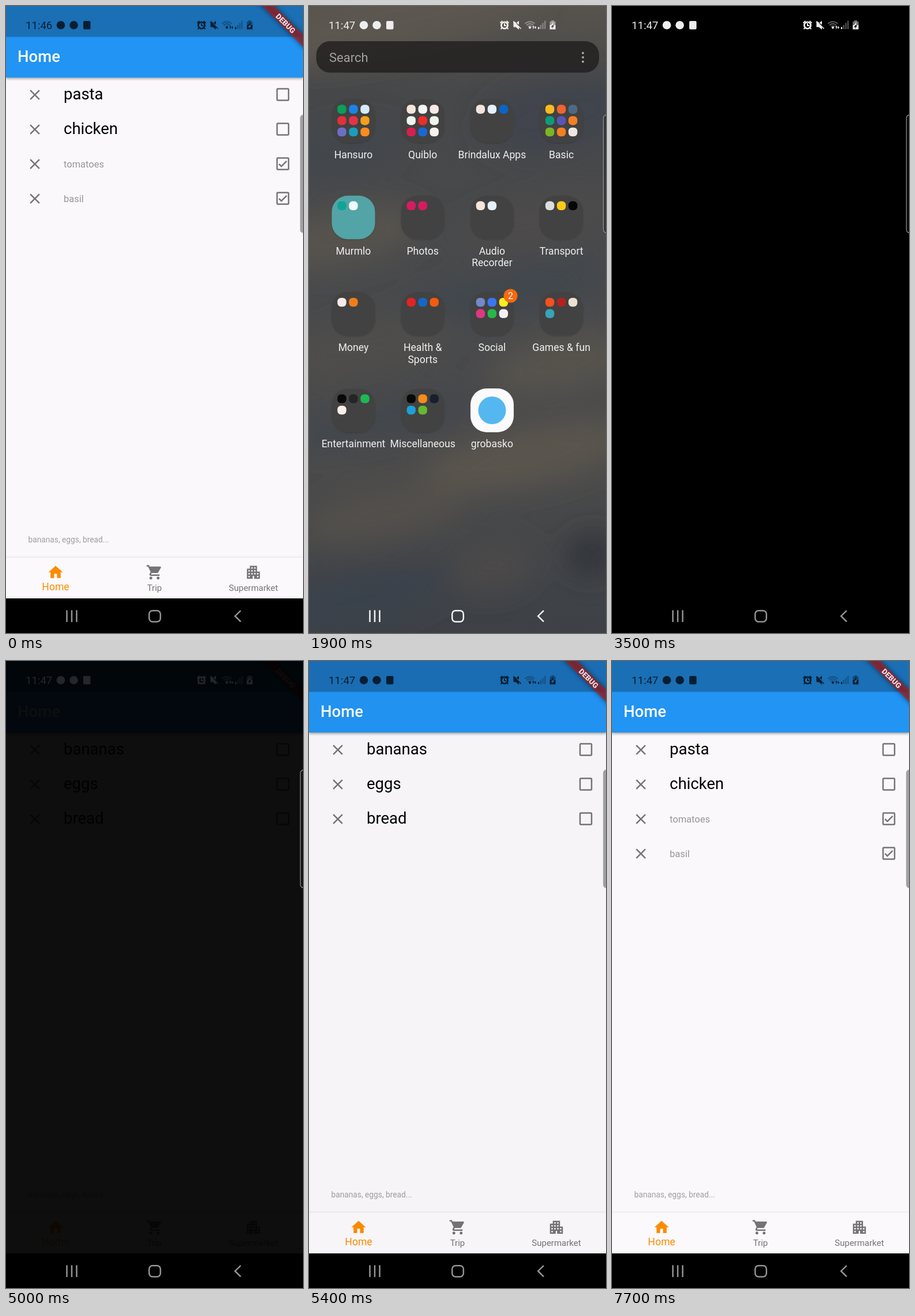
These frames come from a looping animation (515 px wide and 1087 px high, 7.8 s). An HTML page:

```html
<!DOCTYPE html>
<html lang="en">
<head>
<meta charset="utf-8">
<title>Shopping list</title>
<style>
  html, body { margin: 0; width: 100%; height: 100%; overflow: hidden; background: #000; }
  svg { display: block; width: 100vw; height: 100vh; }
  text { font-family: Roboto, sans-serif; white-space: pre; }
  .mid { text-anchor: middle; }
</style>
</head>
<body>
<svg id="stage" viewBox="0 0 515 1087" preserveAspectRatio="none"></svg>
<script>
const LOOP = 7800, STEP = 100, W = 515, H = 1087;
const ICON = { x: 280, y: 663, w: 75, h: 76, r: 28 };
const GREY = '#747376';

const PATHS = {
  clear: 'M19 6.41 17.59 5 12 10.59 6.41 5 5 6.41 10.59 12 5 17.59 6.41 19 12 13.41 17.59 19 19 17.59 13.41 12z',
  box: 'M19 5v14H5V5h14m0-2H5c-1.1 0-2 .9-2 2v14c0 1.1.9 2 2 2h14c1.1 0 2-.9 2-2V5c0-1.1-.9-2-2-2z',
  check: 'M17.99 9l-1.41-1.42-6.59 6.59-2.58-2.57-1.42 1.41 4 3.99z',
  home: 'M10 20v-6h4v6h5v-8h3L12 3 2 12h3v8z',
  cart: 'M7 18c-1.1 0-1.99.9-1.99 2S5.9 22 7 22s2-.9 2-2-.9-2-2-2zM1 2v2h2l3.6 7.59-1.35 2.45c-.16.28-.25.61-.25.96 0 1.1.9 2 2 2h12v-2H7.42c-.14 0-.25-.11-.25-.25l.03-.12.9-1.63h7.45c.75 0 1.41-.41 1.75-1.03l3.58-6.49A1 1 0 0 0 20 4H5.21l-.94-2H1zm16 16c-1.1 0-1.99.9-1.99 2s.89 2 1.99 2 2-.9 2-2-.9-2-2-2z',
  city: 'M17 11V3H7v4H3v14h8v-4h2v4h8V11h-4zM7 19H5v-2h2v2zm0-4H5v-2h2v2zm0-4H5V9h2v2zm4 4H9v-2h2v2zm0-4H9V9h2v2zm0-4H9V5h2v2zm4 8h-2v-2h2v2zm0-4h-2V9h2v2zm0-4h-2V5h2v2zm4 12h-2v-2h2v2zm0-4h-2v-2h2v2z'
};

const icon = (name, x, y, fill = GREY) =>
  `<path d="${PATHS[name]}" fill="${fill}" transform="translate(${x} ${y}) scale(1.25)"/>`;
const label = (str, x, y, size, fill, extra = '') =>
  `<text x="${x}" y="${y}" font-size="${size}" fill="${fill}" ${extra}>${str}</text>`;
const dot = (x, y, r, fill) => `<circle cx="${x}" cy="${y}" r="${r}" fill="${fill}"/>`;
const box = (x, y, w, h, r, fill, extra = '') =>
  `<rect x="${x}" y="${y}" width="${w}" height="${h}" rx="${r}" fill="${fill}" ${extra}/>`;

// Launcher: label, mini icon colours, optional tile colour
const FOLDERS = [
  ['Hansuro', '#0b9f59 #1c83e6 #d5ebf7 #e0303c #e5324a #f3a01c #6b70c4 #1b9ebb #fb8b1f'],
  ['Quiblo', '#f3e7dc #f4f3f5 #f8e9e6 #eef5ee #ee2d2b #f0f4ec #d81f4e #1a68d4 #f6f2ee'],
  ['Brindalux Apps', '#f4e4df #e6f1fb #0a66c2'],
  ['Basic', '#f8bb20 #ef6430 #4c6a85 #0d9c78 #5a55b5 #f58023 #7bb526 #f38022 #ece7e2'],
  ['Murmlo', '#0fa596 #eefaf7', '#52a4a6'],
  ['Photos', '#d81b60 #d81b60'],
  ['Audio|Recorder', '#f6e5da #e6f1fb'],
  ['Transport', '#dedede #ffc917 #050505'],
  ['Money', '#f7eaea #f07d1c'],
  ['Health &amp;|Sports', '#e02424 #1766c4 #f55a10'],
  ['Social', '#7289c9 #3a76f0 #f9ec1f #dc3980 #27b848 #f3eff3'],
  ['Games &amp; fun', '#f4511e #b32220 #e9e2d0 #38a3b8'],
  ['Entertainment', '#090909 #252525 #1db954 #faeee6'],
  ['Miscellaneous', '#080808 #f78c17 #17202b #1f9fd8 #66b82e']
];

function tile(i) {
  return { x: 77 + 120.2 * (i % 4), y: 199 + 167.3 * Math.floor(i / 4) };
}

function caption(str, x, y) {
  return str.split('|').map((s, k) =>
    label(s, x, y + 64.5 + 20.5 * k, 17.6, '#f1f0f0', 'class="mid"')).join('');
}

function folder([name, colors, fill = '#434343'], i) {
  const { x, y } = tile(i);
  const minis = colors.split(' ').map((c, k) =>
    box(x - 27.7 + 20 * (k % 3), y - 27.7 + 19.7 * Math.floor(k / 3), 15.4, 15.4, 6.2, c)).join('');
  return box(x - 37.5, y - 37.5, 75, 75.5, 28, fill, 'filter="url(#lift)"') +
    minis + caption(name, x, y);
}

// Soft patches: x, y, rx, ry, colour
const PATCHES = [
  [150, 20, 260, 60, '#5b564f'], [430, 190, 130, 60, '#3f454d'],
  [50, 250, 110, 40, '#42474d'], [60, 400, 140, 50, '#57534e'],
  [400, 370, 150, 40, '#4d4c4b'], [330, 500, 180, 34, '#41464d'],
  [100, 590, 150, 44, '#504e4c'], [440, 620, 130, 50, '#56524d'],
  [120, 720, 170, 34, '#42474e'], [380, 780, 190, 50, '#5a554e'],
  [130, 880, 150, 46, '#53504c'], [320, 970, 70, 44, '#4b4a4a'],
  [490, 950, 45, 36, '#33363b'], [80, 1030, 170, 44, '#3b424b']
];

function launcher() {
  const patches = PATCHES.map(([x, y, rx, ry, c]) =>
    `<ellipse cx="${x}" cy="${y}" rx="${rx}" ry="${ry}" fill="${c}" transform="rotate(-12 ${x} ${y})"/>`).join('');
  const last = tile(14);
  const menu = [81.5, 89, 96.5].map(y => dot(475, y, 2, '#aaa7a6')).join('');
  return box(0, 0, W, H, 0, 'url(#wall)') + `<g filter="url(#soft)">${patches}</g>` +
    `<g id="icons">` +
    box(12.5, 61, 490.5, 54.5, 24, '#221f1f', 'fill-opacity=".82"') +
    label('Search', 35, 97, 22, '#a3a09f') + menu +
    FOLDERS.map(folder).join('') +
    dot(349.5, 502.5, 12, '#f56a0e') + label('2', 349.5, 508, 16, '#fff', 'class="mid"') +
    box(ICON.x, ICON.y, ICON.w, ICON.h, ICON.r, '#fbfafc') +
    dot(317.5, 701, 24, '#55b7f0') + caption('grobasko', last.x, last.y) + `</g>`;
}

function row([name, done], i) {
  const y = 153.5 + 60 * i;
  return icon('clear', 35, y - 14.5) + icon('box', 465, y - 15) +
    (done ? icon('check', 465, y - 15) + label(name, 100, y + 6, 16.5, '#989699')
          : label(name, 100, y + 8.8, 27.5, '#000'));
}

const list = (id, rows) => `<g id="${id}">${rows.map(row).join('')}</g>`;

function app() {
  const tabs = [['Home', 'home', 86, 17.6, '#fb8c00'], ['Trip', 'cart', 257.5, 15, GREY],
    ['Supermarket', 'city', 429, 15, GREY]];
  return box(0, 0, W, H, 0, '#faf8fb') +
    box(0, 53, W, 71, 0, '#2094f3', 'filter="url(#drop)"') + box(0, 0, W, 53.5, 0, '#1a6fb5') +
    label('Home', 20, 97.3, 27.5, '#fff', 'font-weight="500"') +
    list('saved', [['pasta'], ['chicken'], ['tomatoes', 1], ['basil', 1]]) +
    list('starter', [['bananas'], ['eggs'], ['bread']]) +
    label('bananas, eggs, bread...', 38.5, 930, 13.75, '#a09ea1') +
    box(0, 953, W, 4, 0, 'url(#lip)') + box(0, 956.5, W, 71, 0, '#fbf9fc') +
    tabs.map(([s, ic, x, size, c]) => icon(ic, x - 15, 966.8, c) +
      label(s, x, s === 'Home' ? 1013 : 1014, size, c, 'class="mid"')).join('') +
    box(0, 1027, W, 60, 0, '#000') +
    `<g transform="translate(515 0) rotate(45)">` +
    box(-60, 35, 120, 15, 0, '#000', 'opacity=".5" filter="url(#glow)"') +
    box(-60, 35, 120, 15, 0, '#b71c1c', 'fill-opacity=".63"') +
    label('DEBUG', 0, 47.3, 13, '#eadde0', 'class="mid" font-weight="900"') + `</g>`;
}

function status() {
  const arcs = [4.5, 8, 11.5].map(r => {
    const d = r * .72;
    return `<path d="M${383 - d} ${39 - d}A${r} ${r} 0 0 1 ${383 + d} ${39 - d}" opacity=".4"/>`;
  }).join('');
  const bars = [0, 1, 2, 3].map(i =>
    box(397 + 3.7 * i, 36.5 - 3.6 * i, 2.3, 3.5 + 3.6 * i, 0, 'currentColor', `opacity="${i ? .35 : 1}"`)).join('');
  return `<g id="status">` + label('11:46', 34, 39.8, 18.6, 'currentColor', 'id="clock"') +
    dot(95, 33.2, 7.3, 'currentColor') + dot(117.5, 33.2, 7.3, 'currentColor') +
    box(134, 26, 12.5, 14.5, 2, 'currentColor') +
    `<g fill="none" stroke="currentColor" stroke-width="2">
      <circle cx="339" cy="33.5" r="5.6" stroke-width="2.8"/>
      <path d="M339 30v4h3.2M331.5 29.5l4-3.5M346.5 29.5l-4-3.5M334.5 38l-2 2M343.5 38l2 2"/>
      ${arcs}</g>
    <path fill="currentColor" d="M354.5 30.2h4l5.5-4.8v7L355 26l-1 1.2zM354.5 30.5v6h4l5.5 4.5v-4l3 3 1-1.3L355 26z"/>
    <circle cx="383" cy="37.5" r="2" fill="currentColor"/>
    <path fill="currentColor" d="M389 34l2 2.5h-1.3v3h-1.4v-3H387zM392.5 39.5l-2-2.5h1.3v-2h1.4v2h1.3z"/>
    ${bars}
    <path fill="currentColor" opacity=".5" d="M420 25h5v2h2.5v6h-10v-6h2.5z"/>
    <path fill="currentColor" d="M423.6 27.5l-3.6 5.5h-2.5v7.5h4l.6-3.8h-2.5l2.5-3.7 2.9.7-3.2 5.6v1.2h5.7V33h-4.3z"/></g>`;
}

function buttons() {
  return box(359, 1027, 85, 60, 30, '#fff', 'id="ripple"') +
    `<g id="nav" fill="none" stroke-width="2.5">
      <path d="M105.5 1047.5v20.5M114 1047.5v20.5M122.5 1047.5v20.5"/>
      <rect x="248.2" y="1048.2" width="19.6" height="19.4" rx="6"/>
      <path d="M407 1048.2l-9.8 9.5 9.8 9.6"/></g>`;
}

document.getElementById('stage').innerHTML = `
  <defs>
    <linearGradient id="wall" x2="0" y2="1">
      <stop offset="0" stop-color="#57534d"/><stop offset=".14" stop-color="#47484a"/>
      <stop offset=".45" stop-color="#494a4c"/><stop offset=".75" stop-color="#4b4b4b"/>
      <stop offset="1" stop-color="#3d4147"/>
    </linearGradient>
    <linearGradient id="lip" x2="0" y2="1">
      <stop offset="0" stop-color="#000" stop-opacity="0"/><stop offset="1" stop-color="#000" stop-opacity=".07"/>
    </linearGradient>
    <filter id="soft" x="-20%" y="-20%" width="140%" height="140%"><feGaussianBlur stdDeviation="24"/></filter>
    <filter id="glow" x="-20%" y="-150%" width="140%" height="400%"><feGaussianBlur stdDeviation="4"/></filter>
    <filter id="lift"><feDropShadow dx="0" dy="1" stdDeviation="1" flood-opacity=".2"/></filter>
    <filter id="drop" x="-5%" y="-10%" width="110%" height="140%">
      <feDropShadow dx="0" dy="2" stdDeviation="2.2" flood-opacity=".38"/>
    </filter>
    <clipPath id="frame"><rect id="frameBox"/></clipPath>
  </defs>
  <g id="launcher">${launcher()}</g>
  <g id="app"><g clip-path="url(#frame)">${app()}</g></g>
  <rect id="splash"/>
  ${status()}${buttons()}
  <rect x="510.5" y="189" width="20" height="204" rx="5" fill="#1c1c1c" fill-opacity=".4" stroke="#a2a2a2" stroke-opacity=".85" stroke-width="1.3"/>`;

const $ = id => document.getElementById(id);
const show = (id, on) => $(id).style.display = on ? '' : 'none';

// Tables of [time, value], linear between entries
const TRACKS = {
  shrink: [[1300, 0], [1400, .16], [1500, .55], [1600, .86], [1700, 1]],
  appAlpha: [[1400, 1], [1500, .9], [1600, .55], [1700, .15], [1800, 0], [4999, 0], [5000, 1]],
  icons: [[1400, 0], [1500, .3], [1700, .9], [1800, 1]],
  grow: [[2900, 0], [3000, .2], [3100, .6], [3200, .88], [3300, 1]],
  splash: [[2900, 0], [3000, .55], [3100, .9], [3200, 1], [4999, 1], [5000, .945], [5100, .7],
    [5200, .35], [5300, .1], [5400, .017], [5500, 0]],
  ink: [[1400, 0], [1700, 238], [5000, 238], [5100, 90], [5200, 0]],
  inkAlpha: [[1400, .72], [1700, 1], [4999, 1], [5000, .14], [5100, .3], [5400, .72]],
  nav: [[1199, 148], [1200, 245], [2800, 245], [3300, 148]],
  ripple: [[1199, 0], [1200, .22], [1300, .17], [1400, .08], [1500, 0]]
};

function at(name, t) {
  const tr = TRACKS[name];
  const i = tr.findIndex(k => k[0] > t);
  if (i === 0) return tr[0][1];
  if (i < 0) return tr[tr.length - 1][1];
  const [t0, a] = tr[i - 1], [t1, b] = tr[i];
  return a + (b - a) * (t - t0) / (t1 - t0);
}

// Window between full screen (p = 0) and launcher icon (p = 1)
function rectAt(p) {
  return { x: ICON.x * p, y: ICON.y * p, width: W + (ICON.w - W) * p,
    height: H + (ICON.h - H) * p, rx: ICON.r * Math.min(1, p * 3) };
}

function setAttrs(id, attrs) {
  for (const k in attrs) $(id).setAttribute(k, attrs[k]);
}

function render(t) {
  const open = t >= 5000;
  const win = rectAt(open ? 0 : at('shrink', t));
  const s = win.width / W;
  setAttrs('frameBox', { width: W, height: win.height / s, rx: win.rx / s });
  setAttrs('app', { transform: `translate(${win.x} ${win.y}) scale(${s})`, opacity: at('appAlpha', t) });
  show('app', at('appAlpha', t) > 0);
  show('launcher', t < 3300);

  const k = at('icons', t), z = .92 + .08 * k;
  setAttrs('icons', { opacity: k, transform: `translate(${257.5 * (1 - z)} ${543.5 * (1 - z)}) scale(${z})` });
  setAttrs('splash', { ...rectAt(1 - at('grow', t)), opacity: at('splash', t) });

  const fresh = open && t < 6000;
  show('starter', fresh);
  show('saved', !fresh);

  const g = Math.round(at('ink', t)), n = Math.round(at('nav', t));
  $('status').style.color = `rgb(${g},${g},${g})`;
  $('status').style.opacity = at('inkAlpha', t);
  $('clock').textContent = t < 1500 ? '11:46' : '11:47';
  setAttrs('nav', { stroke: `rgb(${n},${n},${n})` });
  setAttrs('ripple', { opacity: at('ripple', t) });
}

const start = performance.now();
function tick() {
  const t = (performance.now() - start) % LOOP;
  render(Math.floor(t / STEP) * STEP);
  requestAnimationFrame(tick);
}
tick();
</script>
</body>
</html>
```
